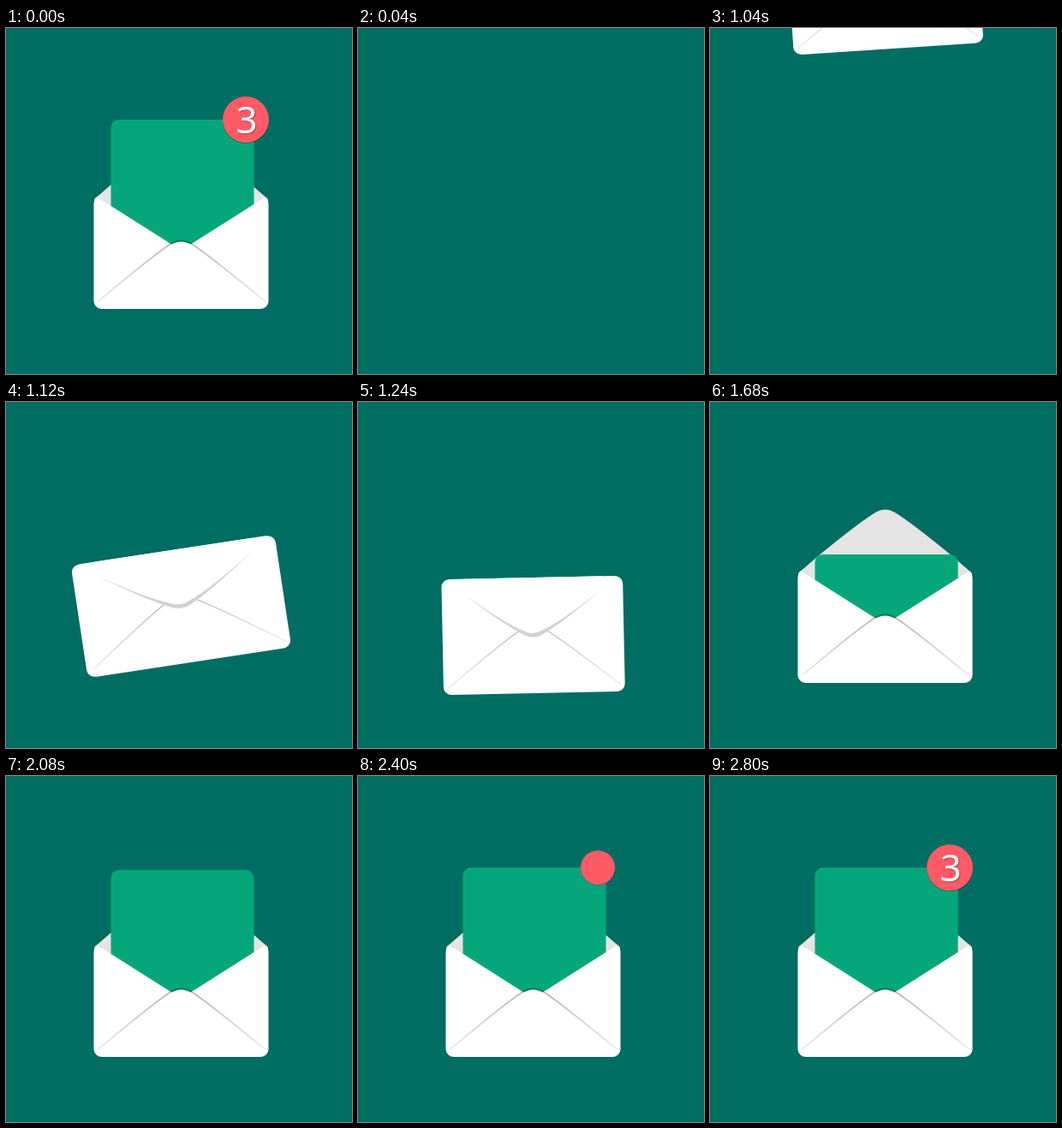
These frames come from a looping animation (404 px wide and 404 px high, 4040 ms). An HTML page:

```html
<!DOCTYPE html>
<html lang="en">
<head>
<meta charset="utf-8">
<title>New mail</title>
<style>
  html, body { margin: 0; width: 100%; height: 100%; overflow: hidden; background: #006d62; }
  svg { display: block; width: 100vw; height: 100vh; }
  text { font-family: "Noto Sans", "Open Sans", sans-serif; font-size: 44px; font-weight: 500; text-anchor: middle; }
</style>
</head>
<body>
<svg viewBox="0 0 404 404">
  <defs>
    <linearGradient id="crease" gradientUnits="userSpaceOnUse" x1="107" y1="0" x2="302" y2="0">
      <stop offset="0" stop-color="#000" stop-opacity=".08"/>
      <stop offset=".42" stop-color="#000" stop-opacity=".28"/>
      <stop offset=".58" stop-color="#000" stop-opacity=".28"/>
      <stop offset="1" stop-color="#000" stop-opacity=".08"/>
    </linearGradient>
    <path id="fold" d="M108 320Q170 268 191 254Q204.500 245 218 254Q239 268 302 320"/>
    <path id="flap" d="M103 200L126 180Q176 139 194 128.500Q204.500 122.500 215 128.500Q233 139 283 180L306 200Z"/>
    <clipPath id="pocket"><rect x="102.500" y="100" width="204" height="228" rx="9"/></clipPath>
  </defs>

  <g id="closed">
    <rect x="102.500" y="194" width="204" height="134" rx="9" fill="#fff"/>
    <use href="#fold" fill="none" stroke="url(#crease)" stroke-width="1.200"/>
    <path d="M127 211Q170 247 193 259Q204.500 266 216 259Q239 247 284 208L284 194H127Z" fill="#fff"/>
    <path d="M127 211Q170 247 193 259.500Q204.500 267 216 259.500Q239 246 284 208Q236 246 214 255.500Q204.500 261 195 256Q170 245 127 211Z" fill="#d2d2d2"/>
  </g>

  <g id="open">
    <use id="back" href="#flap" fill="#e4e4e4"/>
    <path d="M103 201L108 196H301L306 201L204.500 262Z" fill="#e4e4e4"/>
    <g clip-path="url(#pocket)">
      <rect id="paper" x="122.500" width="167" height="170" rx="9" fill="#05a77a"/>
    </g>
    <path d="M102.500 206Q102.500 200 106 197.200L194 253H215L303 197.200Q306.500 200 306.500 206V319A9 9 0 0 1 297.500 328H111.500A9 9 0 0 1 102.500 319Z" fill="#fff"/>
    <use href="#fold" y="-.8" fill="none" stroke="url(#crease)" stroke-width="2.200"/>
    <use href="#fold" fill="#fff"/>
    <use id="front" href="#flap" fill="#fff"/>
  </g>

  <g id="splash" fill="none" stroke="#fff" stroke-width="2" stroke-linecap="round"></g>

  <g id="badge">
    <circle cx="280" cy="108" r="27" fill="#000" opacity=".3"/>
    <circle cx="280" cy="107" r="27" fill="#ff5a65"/>
  </g>
  <g id="digit">
    <text x="282" y="123.500" fill="#7d2c35" opacity=".6">3</text>
    <text x="281" y="122.500" fill="#fff">3</text>
  </g>
</svg>
<script>
const LOOP = 4040, STEP = 40;
const CX = 204.5, CY = 261, W = 204, H = 134, HINGE = 197;
const $ = id => document.getElementById(id);
const clamp = v => Math.max(0, Math.min(1, v));
const span = (t, a, b) => clamp((t - a) / (b - a));
const easeOut = u => 1 - (1 - u) ** 2;
const show = (el, on) => el.style.display = on ? "" : "none";

// time, centre x, centre y, angle, width, height
const poses = [
  [1040, 204.4, -41, -3.7, 222, 131],
  [1120, 204.5, 238.5, -8.6, 240.5, 133],
  [1200, 204.5, 271, -4, 224, 133],
  [1320, 204.7, 266, 4, 188, 140],
  [1400, 204.8, 262.6, 5, 184, 142.5],
  [1500, 204.6, 261, 2, 197, 137],
  [1600, CX, CY, 0, W, H]
];

// start x, start y, end x, end y, begin, finish
const sparks = [
  [54, 340.5, 41, 338, 1300, 1600],
  [76, 364, 41, 391.5, 1240, 1600],
  [92.5, 388, 90.5, 400, 1300, 1600]
];
const lines = sparks.map(() =>
  $("splash").appendChild(document.createElementNS("http://www.w3.org/2000/svg", "line")));

function poseAt(t) {
  let i = 0;
  while (i < poses.length - 2 && t > poses[i + 1][0]) i++;
  const a = poses[i], b = poses[i + 1];
  const before = poses[i - 1] || a, after = poses[i + 2] || b;
  const d = b[0] - a[0], u = span(t, a[0], b[0]);
  return a.slice(1).map((p, j) => {
    const k = j + 1, q = b[k];
    const m = (q - before[k]) / (b[0] - before[0]) * d;
    const n = after === b ? 0 : (after[k] - p) / (after[0] - a[0]) * d;
    return p + u * (m + u * (3 * (q - p) - 2 * m - n + u * (2 * (p - q) + m + n)));
  });
}

function drawClosed(t) {
  const [x, y, angle, w, h] = poseAt(t);
  $("closed").setAttribute("transform",
    `translate(${x} ${y}) rotate(${angle}) scale(${w / W} ${h / H}) translate(${-CX} ${-CY})`);
}

function drawOpen(t) {
  const turn = -Math.cos(Math.PI * span(t, 1580, 1680));
  const fold = `translate(0 ${HINGE * (1 - turn)}) scale(1 ${turn})`;
  for (const id of ["back", "front"]) $(id).setAttribute("transform", fold);
  show($("back"), turn > 0);
  show($("front"), turn < 0);
  $("paper").setAttribute("y", 107 + 89 * (1 - easeOut(span(t, 1620, 2180))));
}

function drawSplash(t) {
  sparks.forEach(([x1, y1, x2, y2, begin, finish], i) => {
    const u = span(t, begin, finish);
    const head = easeOut(clamp(u * 1.35)), tail = u * u;
    const set = (k, v) => lines[i].setAttribute(k, v);
    set("x1", x1 + (x2 - x1) * tail);
    set("y1", y1 + (y2 - y1) * tail);
    set("x2", x1 + (x2 - x1) * head);
    set("y2", y1 + (y2 - y1) * head);
    show(lines[i], u > 0 && u < 1);
  });
}

function draw(time) {
  let t = Math.floor(time % LOOP / STEP) * STEP;
  if (t < STEP) t = LOOP;
  show($("closed"), t >= 1040 && t < 1600);
  show($("open"), t >= 1600);
  drawClosed(t);
  drawOpen(t);
  drawSplash(t);
  const s = easeOut(span(t, 2130, 2680));
  $("badge").setAttribute("transform", `translate(${280 * (1 - s)} ${107 * (1 - s)}) scale(${s})`);
  show($("badge"), s > 0);
  $("digit").setAttribute("opacity", span(t, 2480, 2800));
}

const start = performance.now();
function tick() {
  draw(performance.now() - start);
  requestAnimationFrame(tick);
}
tick();
</script>
</body>
</html>
```
